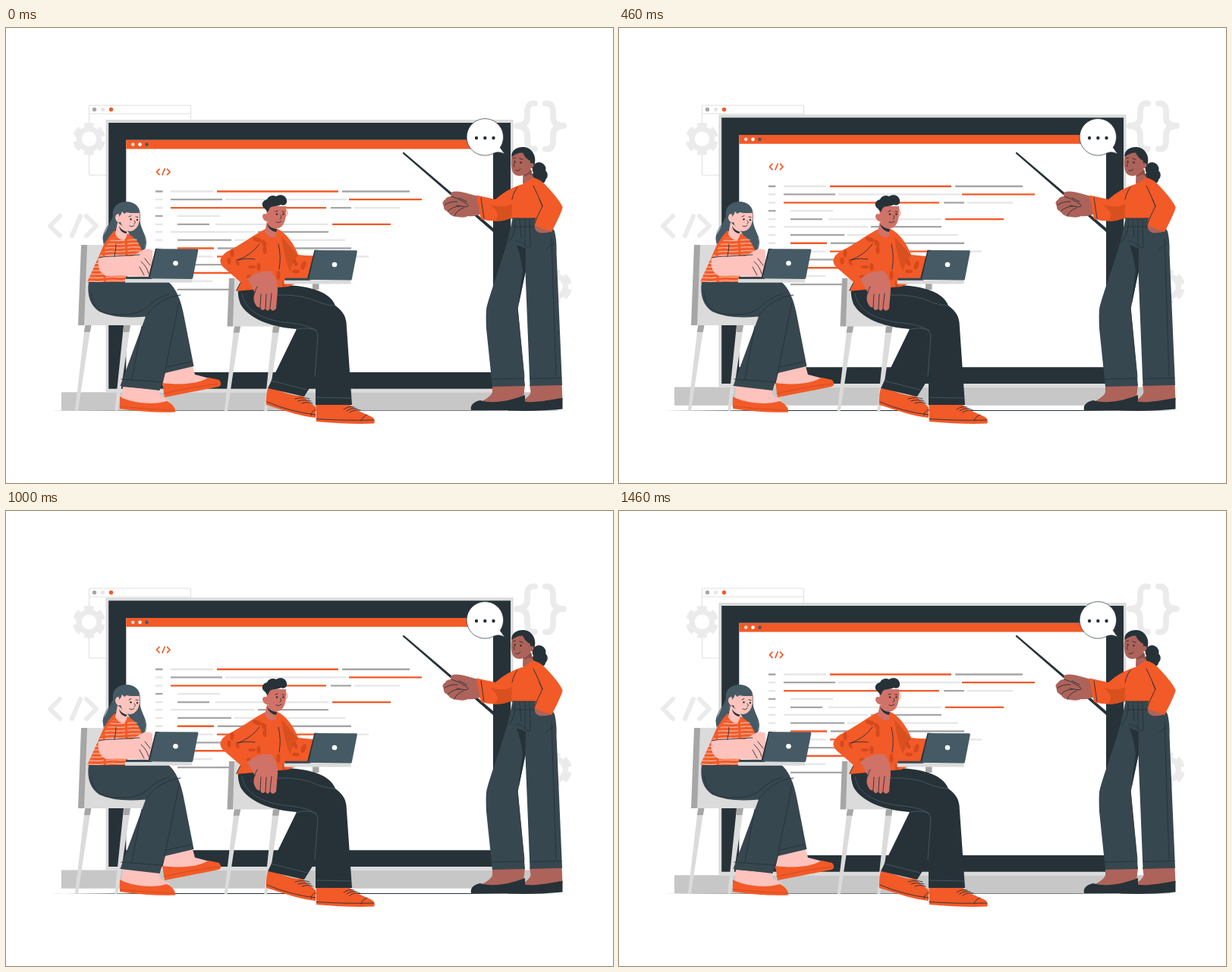
These frames come from a looping animation (800x600 px, 1.5 s). An HTML page:

```html
<!DOCTYPE html>
<html lang="en">
<head>
<meta charset="utf-8">
<title>Programming class</title>
<style>
  html, body { margin: 0; width: 100%; height: 100%; overflow: hidden; background: #fff; }
  svg { display: block; width: 100%; height: 100%; }
  .orange { fill: #f25a28; }
  .rust { fill: #d4491d; }
  .shade { fill: #d9501f; }
  .ink { fill: #263238; }
  .slate { fill: #37474f; }
  .steel { fill: #455a64; }
  .pale { fill: #dbdbdb; }
  .grey { fill: #a6a6a6; }
  .white { fill: #fff; }
  .pink { fill: #ffc3bd; }
  .rose { fill: #d07267; }
  .brown { fill: #ad6359; }
  .line { fill: none; stroke: #263238; stroke-width: .9; stroke-linecap: round; stroke-linejoin: round; }
  .fine { fill: none; stroke: #4b5f69; stroke-width: .8; }
  .faint { fill: none; stroke: #ebebeb; stroke-linecap: round; stroke-linejoin: round; }
  .code { fill: none; stroke-width: 2.3; }
</style>
</head>
<body>
<svg viewBox="0 0 800 600">
  <defs>
    <g id="gear" class="faint" style="stroke-linecap:butt">
      <circle class="white" r="13.300" stroke-width="7"/>
      <circle r="18.400" stroke-width="6" pathLength="12" stroke-dasharray="1.3 .7" transform="rotate(10.500)"/>
    </g>
    <path id="brace" class="faint" stroke-width="7.800" d="M697 99.500C686 98 687 108 687 117Q687 129 673 129Q687 129 687 142C687 151 686 161 697 159.500"/>
    <g id="legs">
      <path class="pale" d="M104 392h8L95 504q-2 2-4 0ZM155 392h9L147.500 504q-2 2-4 0Z"/>
      <path class="grey" d="M104.500 392h8l-1.700 9h-8ZM155.500 392h8.500l-1.700 9h-8Z"/>
    </g>
    <g id="laptop">
      <path class="ink" d="M197 291h5l-10 40h-5Z"/>
      <path class="steel" d="M200 291.300l52 .2q1.700 0 1.300 2l-7 36q-.4 1.500-2 1.500l-55-.6 8.500-37q.5-2 2.200-2.100Z"/>
      <circle class="white" cx="223.500" cy="310.300" r="3.300"/>
      <path class="slate" d="M158 328h32v4h-32Z"/>
      <path class="pale" d="M157 331h88v4.700h-88Z"/>
    </g>
    <pattern id="stripes" width="30" height="4.800" patternUnits="userSpaceOnUse" patternTransform="rotate(-2)">
      <path d="M0 2q8-.8 14 0t13 0" fill="none" stroke="#fff" stroke-width=".75"/>
    </pattern>
  </defs>

  <!-- Backdrop -->
  <g>
    <path d="M109.500 102H243.500V194H109.500ZM109.500 113H243.500" fill="#fff" stroke="#e0e0e0"/>
    <circle class="grey" cx="116.500" cy="107.500" r="2.700"/>
    <circle fill="#e6e6e6" cx="127.500" cy="107.500" r="2.700"/>
    <circle class="orange" cx="138.500" cy="107.500" r="2.700"/>
    <use href="#gear" x="109.500" y="146.300"/>
    <use href="#gear" transform="translate(723.500 341) scale(1.040)"/>
    <path class="faint" stroke-width="6" d="M71 248L58 261 71 274M98 248L87 274M106 248L119 261 106 274"/>
    <use href="#brace"/>
    <use href="#brace" transform="translate(1408) scale(-1 1)"/>
    <path class="ink" d="M58 504.500L200 504H600L743 504.500 600 505H200Z"/>
  </g>

  <!-- Floating screen -->
  <g id="screen">
    <path fill="#c7c7c7" d="M73 480.600H727V504.700H73Z"/>
    <path class="pale" d="M131.500 121.200H668.500V480.600H131.500Z"/>
    <path class="ink" d="M135.200 125.300H665V476H135.200Z"/>
    <path class="white" d="M158.300 148H642V454.200H158.300Z"/>
    <path class="orange" d="M158.300 148H642V159.700H158.300Z"/>
    <circle fill="#d8d8d8" cx="167.300" cy="153.900" r="2.300"/>
    <circle class="white" cx="176.500" cy="153.900" r="2.300"/>
    <circle class="steel" cx="185.500" cy="153.900" r="2.300"/>
    <path fill="none" stroke="#f25a28" stroke-width="1.700" d="M202.500 185.900L198.500 190 202.500 194.100M209.500 185.500L205.800 194.500M212 185.900L216 190 212 194.100"/>
    <path class="code" stroke="#e6e6e6" d="M217 215.800h56M197 226.500h9.500M289 226.500h160M197 237.400h9.500M459 237.400h60M226 248.200h56M197 259.100h9.500M276 259.100h149M197 269.200h9.500M217 269.200h111M197 280h9.500M301 280h146M197 290.800h9.500M226 301.600h47M443 301.600h35M226 334.200h46"/>
    <path class="code" stroke="#a6a6a6" d="M197 215.800h9.500M443 215.800h89M217 226.500h68M428 237.400h27M197 248.200h9.500M226 259.100h42M332 269.200h93M226 280h71M279 290.800h176M226 312.500h100M226 345.100h69"/>
    <path class="code" stroke="#f25a28" d="M278 215.800h160M452 226.500h96M217 237.400h205M430 259.100h77M226 290.800h48M278 301.600h160M226 323.300h94"/>
  </g>

  <!-- Speech bubble -->
  <path d="M651.200 157.600A24.200 24.200 0 1 0 643 165Q650 162 657.300 166.300Z" fill="#fff" stroke="#263238" stroke-width=".7"/>
  <g class="ink">
    <circle cx="620" cy="145" r="2.200"/><circle cx="631.300" cy="145" r="2.200"/><circle cx="642.500" cy="145" r="2.200"/>
  </g>

  <!-- Teacher -->
  <g>
    <path class="ink" d="M522.600 165.200L524 163.600 644 265.400 642.300 269.200Z"/>
    <path class="brown" d="M641 470h43l-2 18-22 8-38-1q18-9 19-15ZM690 470h42.500l1 20-25 7-36-1q18-9 19-16Z"/>
    <path class="ink" d="M613 504C611 496 619 492 625 491 642 496 664 492 684 484V504ZM661 504.500C660 496 668 492 674 490.500 692 497 715 490 733.500 488V502.500Q700 506 661 504.500Z"/>
    <path class="slate" d="M668 250H712L723 268Q726 280 725.500 296L733 471 690.500 472 684.500 322 674.500 370 684 472 641 473 633 396Q632 372 634 366C643 335 658 296 663 272Z"/>
    <path class="ink" d="M673 286L685 291 684.500 322 675 368Q677 345 681 320 679 304 673 286Z"/>
    <path class="line" d="M671 253Q673 270 662 283M677 253L679 277M684 252V286M672 281Q679 281 684 287 690 293 691 288L690 253M668 262H700M674 368L683 460M640 463L683 462M691 462.500L732 461.500M719 278L725 459M722 284Q716 288 712 292"/>
    <path class="brown" d="M697 258Q695 267 703 270 712 271 719 268L716 257Z"/>
    <g class="ink">
      <circle cx="702.500" cy="186" r="9"/><circle cx="705.500" cy="194" r="8.300"/><circle cx="700" cy="195" r="6.500"/><circle cx="706" cy="200" r="5"/>
    </g>
    <path class="brown" d="M667 167C664.500 177 666 187 668.500 191 672 196 678 195.500 682 194L681 205Q690 208 695.500 198L692 188 697 178 688 161Z"/>
    <path fill="#8f4b43" d="M681.500 194Q689 191 692 186L694 195Q686 199 681.500 204Z"/>
    <path class="ink" d="M666.500 170C665 162 673 156 683 157 693 158 699 168 697 178L694 185Q690 181 691 175 685 173 681 164.500 674 164 666.500 170Z"/>
    <circle class="brown" cx="692.500" cy="181" r="3"/>
    <circle class="white" cx="692.500" cy="186" r="1.200"/>
    <path class="line" d="M668.500 172l3-1M677 172l4 1.500M671 177Q668 181 670 183M672 188Q676 189 678 186"/>
    <circle class="ink" cx="670.500" cy="176" r="1.100"/><circle class="ink" cx="678.500" cy="177.500" r="1.200"/>
    <path class="brown" d="M587 216.500C596 213 611 219 622 222L627 245Q616 249 609 248 604 251 595 249 586 249 582 242 576 240 577 234 573 230 579 226 581 222 587 222Q585 219 587 216.500Z"/>
    <path class="line" d="M587 222Q597 225 606 231 612 235 606 236L594 234M577 234Q585 228 595 229M582 242Q589 235 598 235M591 248Q593 241 603 237M597 224L607 229"/>
    <path class="orange" d="M620 220.500L645 226Q660 212 683 205L694 197Q704 199 712 208 729 226 733.500 236 734 240 719 269L696 260 698 251H666.500V250Q650 258 626 252Z"/>
    <path class="shade" d="M667 232L666.500 250Q658 255 643 255 655 246 638 233 656 238 667 232Z"/>
    <path class="brown" d="M682 205L694.500 197 691 193 682 196Z"/>
    <path class="line" d="M695 208Q701 220 707 235 700 248 696 260M667 226Q669 216 674 210M707 235L703 226M626 224L630 251M666 251H698"/>
  </g>

  <!-- Student on the left -->
  <g>
    <use href="#legs"/>
    <path class="pale" d="M105 286H150V378H184V388Q184 392 180 392H102Z"/>
    <path class="grey" d="M99 286H107L103 392H95Z"/>
    <path class="steel" d="M141 248C139 236 148 229 159 229 170 229 178 236 177 250 175 262 184 269 184 282 184 290 182 295 177 297 171 297 167 290 168 281L158 264 144 266Q134 278 135 292 126 282 128 274 133 266 141 248Z"/>
    <path class="line" style="stroke:#455a64" d="M140 254C128 267 126 275 130 289M181 270Q188 282 182 294"/>
    <path class="pink" d="M210 454L246 446 249 457 268 462 263 471 206 471ZM154 473L201 477 203 485 215 491 212 498H152Z"/>
    <path class="orange" d="M206 468C228 471 252 470 267 461L281 464Q286 471 280 473L209 487ZM150 486C164 494 193 498 212 492 220 496 224 502 223 506.500Q190 508 150 502Z"/>
    <path class="line" style="stroke:#d4491d" d="M208 482Q242 474 281 469M150 499Q190 503 222 504"/>
    <path class="slate" d="M109 334H213C224 342 231 359 235 382L247.500 446 209.500 455 202.500 478 150.500 472 184 380.500Q144 384 123 374 105 362 109 334Z"/>
    <path class="line" d="M112 349Q114 378 148 378 174 379 186 368 201 354 215 351M184 380Q202 355 230 352M179 393L166 463M152 463L205 467M212 447L244 440M228 362L209 455"/>
    <path id="shirt" class="orange" d="M143 267Q135 275 128 288L121 304 107 335H160V304L180 296Q177 281 161 271Z"/>
    <use href="#shirt" style="fill:url(#stripes)" visibility="hidden"/>
    <path fill="url(#stripes)" d="M140 276L121 304 107 335H160V304L178 294 172 277Z"/>
    <path class="pink" d="M147 256L144 272Q148 279 155 280 160 277 160 267Z"/>
    <path class="ink" d="M149 261Q152 267 160 269L158 271Q150 269 149 261Z"/>
    <path class="pink" d="M150 242C149 257 154 268 164 268 173 267 178 256 176 242Q162 235 150 242ZM151 246Q144 243 144 251 146 258 151 256Z"/>
    <path class="steel" d="M149 249Q152 246 153 242L156 245 159 243 164 244 176 244Q173 232 160 231 148 235 149 249Z"/>
    <path class="line" d="M162 249l3-1.500M171 249l3 .5M169 254Q172 257 169 258M163 261Q167 263 169 260"/>
    <circle class="ink" cx="164.500" cy="252.300" r="1.200"/><circle class="ink" cx="173" cy="253" r="1.200"/>
    <path class="pink" d="M122 303Q130 300 145 299L166 301 178 294Q185 289 193 293L193 308 191 327 181 328Q152 326 132 327 119 321 122 303Z"/>
    <path class="line" d="M143 301Q145 291 145 285M143 301L176 299M178 308Q186 315 188 324M176 315L182 326M183 304L190 313M123 303Q130 301 143 301"/>
    <use href="#laptop"/>
  </g>

  <!-- Student in the middle -->
  <g>
    <use href="#legs" x="196.800" y=".8"/>
    <path class="pale" d="M299 330H335V378H361V389Q361 393.500 357 393.500H298Z"/>
    <path class="grey" d="M294 330H301L299 393.500H291.500ZM404 337H412.500V345H404Z"/>
    <path class="orange" d="M345 475C357 475 374 486 390 485L408 500V514C386 512 360 502 343 497Q342 486 345 475ZM408.500 496H452C462 506 474 508 484 514Q487 519 485 521.500 455 523 409 519Z"/>
    <path class="line" d="M344 493Q374 506 408 510M409 515.500Q445 518 485 517M381 489Q391 486 400 489M385 492Q393 489 402 492M390 495Q397 492 404 495M445 503Q452 498 459 500M449 505Q456 500 463 502M453 507Q460 502 467 504M476 510Q469 513 468 518M408 503Q402 506 402 511"/>
    <path class="ink" d="M306 344L372 339C402 341 427 348 434 366 443 373 447 378 448.500 388L456 497H408V462L393 486 345 475 383 397C346 394 319 382 309 364Q305 353 306 344Z"/>
    <path class="fine" d="M311 350C314 372 338 386 375 389 397 392 409 396 411 405L407 460M358 352Q391 351 413 362 427 366 434 366M384 397Q400 394 410 399M349 465L397 477M409 487L455 488"/>
    <path class="orange" d="M344 264C324 274 310 286 291 295 281 302 280 309 287 316L309 335 303 347 372 341 398 330 405 301 385 299C379 284 370 271 358 265Z"/>
    <path class="shade" d="M363 275L385 300Q379 306 374 321 366 300 363 275Z"/>
    <g class="rust">
      <ellipse cx="331" cy="279" rx="6.500" ry="3" transform="rotate(20 331 279)"/>
      <ellipse cx="340" cy="284" rx="3" ry="5" transform="rotate(-25 340 284)"/>
      <ellipse cx="341" cy="293" rx="2.500" ry="5"/>
      <ellipse cx="298" cy="297" rx="2.500" ry="5.500"/>
      <ellipse cx="294" cy="307" rx="2.500" ry="4.500"/>
      <ellipse cx="305" cy="309" rx="2" ry="4.500" transform="rotate(-20 305 309)"/>
      <ellipse cx="324" cy="315" rx="5" ry="2"/>
      <ellipse cx="333" cy="315" rx="2.500" ry="5"/>
      <ellipse cx="321" cy="328" rx="4" ry="2.500"/>
      <ellipse cx="359" cy="326" rx="2.500" ry="6"/>
      <ellipse cx="366" cy="337" rx="2" ry="4"/>
      <ellipse cx="381" cy="309" rx="2.500" ry="5" transform="rotate(-25 381 309)"/>
      <ellipse cx="392" cy="313" rx="3" ry="6" transform="rotate(20 392 313)"/>
      <ellipse cx="382" cy="321" rx="5" ry="2.500"/>
    </g>
    <path class="line" d="M334 285Q323 300 305 306 318 303 328 305M359 285Q363 301 360 318M304 346Q306 341 309 336"/>
    <path class="rose" d="M318 331Q331 318 350 321 359 333 358 347L356 370Q351 376 348 369 345 376 342 370 337 375 335 368 331 370 328 363 325 357 328 349Z"/>
    <path class="line" d="M336 351L335 368M343 351L342 370M350 350L348 369M328 349Q329 344 331 341"/>
    <path class="rose" d="M344 255L341 269Q348 279 356 275L357 263Z"/>
    <path class="ink" d="M344 258Q349 265 357 265L356 269Q346 267 344 258Z"/>
    <path class="rose" d="M344 235C342 249 345 263 356 264.500 366 264 370 254 369 235ZM345 246Q338 243 338 249 340 256 346 255Z"/>
    <path class="ink" d="M341 238C335 234 338 227 344 226 346 221 352 220 356 222 362 218 369 221 370 227 371 232 367 235 362 233 357 236 352 234 348 237Q346 240 345 243Z"/>
    <path class="line" d="M355 242l3-1M364 242l3 .5M362 247Q364 251 361 252M356 256Q360 258 363 255"/>
    <circle class="ink" cx="357" cy="245.500" r="1.200"/><circle class="ink" cx="365.500" cy="245.500" r="1.200"/>
    <path fill="none" stroke="#f25a28" stroke-width=".8" d="M367 238Q372 241 370 247L366 250"/>
    <use href="#laptop" x="209.500" y="1.700"/>
  </g>
</svg>
<script>
  const LOOP = 1500, STEPS = 36, RISE = 11;
  const screenGroup = document.getElementById("screen");

  // Linear rise and fall, advancing at 24 steps per second.
  function draw(now) {
    const step = Math.floor(((now + 4) % LOOP) / LOOP * STEPS);
    const phase = (step + 0.5) / STEPS;
    const lift = RISE * (1 - Math.abs(2 * phase - 1));
    screenGroup.setAttribute("transform", `translate(0 ${-lift})`);
  }

  const start = performance.now();
  function tick() {
    draw(performance.now() - start);
    requestAnimationFrame(tick);
  }
  tick();
</script>
</body>
</html>
```
